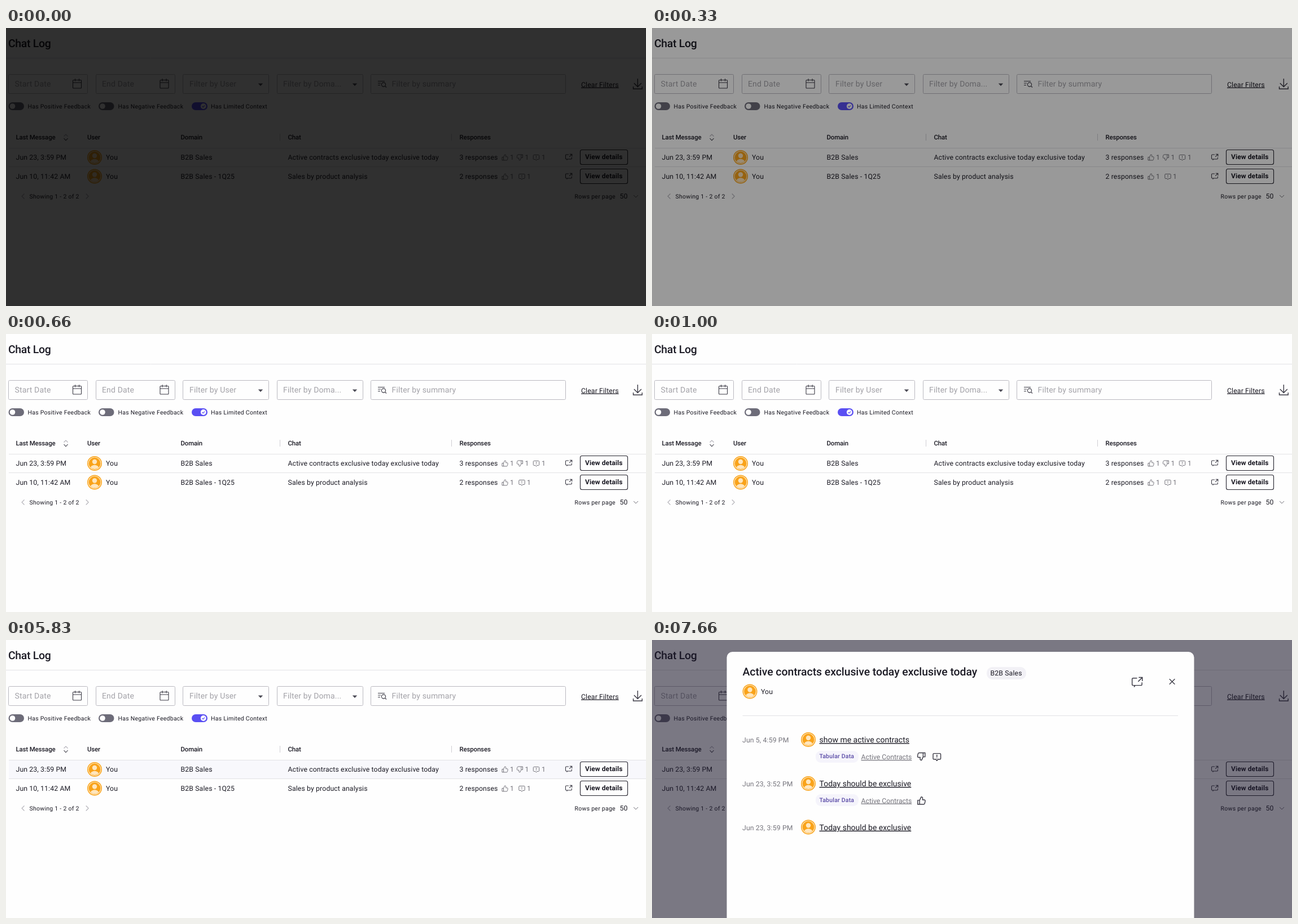
Animation, 1134 px wide and 494 px high, one loop 8000 ms. Source, as an HTML page:

```html
<!DOCTYPE html>
<html lang="en">
<head>
<meta charset="utf-8">
<title>Chat Log</title>
<style>
html, body { margin: 0; width: 100%; height: 100%; overflow: hidden; background: #fefefe; }
svg { display: block; }
text { font: 400 12.25px Roboto, "Noto Sans", sans-serif; letter-spacing: .13px; fill: #1b1a24; text-rendering: geometricPrecision; white-space: pre; }
.title { font-size: 19.4px; font-weight: 500; letter-spacing: -.05px; }
.page-title { letter-spacing: -.3px; }
.hint { font-size: 14px; letter-spacing: .15px; fill: #a3a2a8; }
.small { font-size: 10.5px; letter-spacing: .26px; }
.head { font-size: 11.4px; font-weight: 500; letter-spacing: -.12px; }
.btn { font-size: 12px; font-weight: 600; letter-spacing: .08px; }
.muted { fill: #74737b; }
.msg { font-size: 14px; letter-spacing: 0; }
.link { text-decoration: underline; text-decoration-thickness: 1px; text-underline-offset: 2px; }
.msg.link { text-decoration-color: #85848c; }
.tag { font-weight: 500; letter-spacing: .2px; fill: #594aa6; }
.line { fill: none; stroke: #e2e2e5; }
.field { fill: none; stroke: #bab9c0; }
.icon { fill: none; stroke: #3a3944; stroke-width: 1.1; }
.soft { stroke: #74737b; stroke-width: 1; }
.pale { stroke: #b2b1b8; }

#fade, #shade, #modal, .row { animation: 8s step-end infinite; }
#fade { animation-name: fade; }
#shade { animation-name: shade; }
#modal { animation-name: modal; }
#row1 { animation-name: row1; }
#row2 { animation-name: row2; }
.row { fill: #f8f8fc; }
@keyframes fade {
  0% { opacity: .81; }
  2% { opacity: .6; }
  4.125% { opacity: .4; }
  6.25% { opacity: .2; }
  8.25%, 100% { opacity: 0; }
}
@keyframes row1 {
  0% { opacity: 0; }
  64.5% { opacity: 1; }
  83.25%, 100% { opacity: 0; }
}
@keyframes row2 {
  0% { opacity: 0; }
  62.5% { opacity: 1; }
  64.5% { opacity: .4; }
  66.625%, 100% { opacity: 0; }
}
@keyframes shade {
  0% { opacity: 0; }
  83.25% { opacity: .07; }
  85.375%, 100% { opacity: 1; }
}
@keyframes modal {
  0% { opacity: 0; }
  83.25% { opacity: .07; }
  85.375% { opacity: .97; }
  87.5%, 100% { opacity: 1; }
}
</style>
</head>
<body>
<svg width="1134" height="494" viewBox="0 0 1134 494">
<defs>
  <clipPath id="face"><circle r="10"/></clipPath>
  <g id="avatar">
    <circle r="13" fill="#f9a31a"/>
    <circle r="11" fill="none" stroke="#ffe3b5" stroke-width="1.2"/>
    <g fill="#ffe6bd" clip-path="url(#face)">
      <circle cy="-3" r="4.2"/>
      <ellipse cy="8.2" rx="7.4" ry="5.4"/>
    </g>
  </g>
  <g id="calendar">
    <rect x="-7.5" y="-6.5" width="15" height="14.5" rx="1"/>
    <path d="M-7.5-2h15M-3.5-9v4.5M3.5-9v4.5"/>
  </g>
  <path id="caret" d="M-4.2-2.2h8.4L0 2.4z" fill="#4b4a55"/>
  <path id="chevron" d="M-4-2L0 2 4-2"/>
  <path id="thumb" d="M-5-.5h2.6V5H-5zM-2.4-.5L-.3-5H.4a1.3 1.3 0 0 1 1.3 1.3v2.5h2.1a1.4 1.4 0 0 1 1.4 1.6l-.6 3.1A1.7 1.7 0 0 1 3 5h-5.4"/>
  <path id="note" d="M-1.5 3.5H-4a1.2 1.2 0 0 1-1.2-1.2v-5.6A1.2 1.2 0 0 1-4-4.5h8a1.2 1.2 0 0 1 1.2 1.2v5.6A1.2 1.2 0 0 1 4 3.5H1.5L0 5.3zM0-2.8V.3M0 1.3v1"/>
  <path id="open" d="M0-4.5h-4.3A1.2 1.2 0 0 0-5.5-3.3v5.6a1.2 1.2 0 0 0 1.2 1.2h2.1L-3.4 5.3M-2.2 3.5h6.4a1.2 1.2 0 0 0 1.2-1.2V.2M1.8-5.3h4v4M5.8-5.3L1.2-.7"/>
  <g id="off">
    <rect x="-13.5" y="-7" width="27.5" height="14" rx="7" fill="#6d6c79"/>
    <circle x="0" cx="-6.5" r="4.8" fill="#fefefe"/>
  </g>
  <g id="button">
    <rect x="1017.5" y="-13" width="84" height="26" rx="3" fill="#fefefe" stroke="#24232d" stroke-width="1.1"/>
    <text class="btn" x="1026" y="3.6">View details</text>
    <use href="#open" class="icon" x="997"/>
  </g>
</defs>

<rect width="1134" height="494" fill="#fefefe"/>
<rect id="row1" class="row" x="5" y="214" width="1129" height="32"/>
<rect id="row2" class="row" x="5" y="247" width="1129" height="33"/>
<path class="line" d="M0 53.5h1134M5 213.5h1129M5 246.5h1129"/>

<text class="title page-title" x="4" y="33.6">Chat Log</text>

<g class="field">
  <rect x="4.5" y="82.5" width="140" height="34" rx="2"/>
  <rect x="159.5" y="82.5" width="140" height="34" rx="2"/>
  <rect x="313.5" y="82.5" width="152" height="34" rx="2"/>
  <rect x="480.5" y="82.5" width="152" height="34" rx="2"/>
  <rect x="646.5" y="82.5" width="345" height="34" rx="2"/>
</g>
<text class="hint" x="15.5" y="104">Start Date</text>
<text class="hint" x="170" y="104">End Date</text>
<text class="hint" x="325" y="104">Filter by User</text>
<text class="hint" x="491" y="104">Filter by Doma...</text>
<text class="hint" x="683.5" y="104">Filter by summary</text>
<g class="icon">
  <use href="#calendar" x="126" y="99"/>
  <use href="#calendar" x="280.5" y="99"/>
  <path d="M659 94.5h12M659 98h5M659 101.5h4M672 103.5l2 2"/>
  <circle cx="669" cy="100.5" r="3.6"/>
  <path d="M1119.3 90v14.5M1112.8 98l6.5 6.5 6.5-6.5M1111.5 104v4.3h15.6V104" stroke-width="1.4"/>
</g>
<use href="#caret" x="451" y="100.6"/>
<use href="#caret" x="618" y="100.6"/>
<text class="link" x="1019" y="104.6">Clear Filters</text>

<use href="#off" x="18" y="139"/>
<use href="#off" x="177.5" y="139"/>
<rect x="329" y="132" width="28" height="14" rx="7" fill="#5a4ff3"/>
<circle cx="349.8" cy="139" r="4.9" fill="#fefefe"/>
<path d="M347.5 139l1.7 1.7 2.9-3" fill="none" stroke="#5a4ff3" stroke-width="1.2"/>
<text class="small" x="38.5" y="143">Has Positive Feedback</text>
<text class="small" x="198.5" y="143">Has Negative Feedback</text>
<text class="small" x="363" y="143">Has Limited Context</text>

<text class="head" x="17.5" y="198">Last Message</text>
<text class="head" x="144" y="198">User</text>
<text class="head" x="309.5" y="198">Domain</text>
<text class="head" x="499.5" y="198">Chat</text>
<text class="head" x="803.5" y="198">Responses</text>
<path class="icon pale" d="M102.5 192.5l3.5-3.5 3.5 3.5"/>
<path class="icon" d="M102.5 196l3.5 3.8 3.5-3.8"/>
<path class="line" style="stroke:#cfced4" d="M485.5 188v12M789.5 188v12"/>

<g transform="translate(0 230)">
  <text x="17.5" y="4.2">Jun 23, 3:59 PM</text>
  <use href="#avatar" x="157"/>
  <text x="177" y="4.2">You</text>
  <text x="309.5" y="4.2">B2B Sales</text>
  <text x="499.5" y="4.2">Active contracts exclusive today exclusive today</text>
  <text x="803.5" y="4.2">3 responses</text>
  <g class="icon soft">
    <use href="#thumb" x="884"/>
    <use href="#thumb" transform="translate(910.5 0) rotate(180)"/>
    <use href="#note" x="939.5"/>
  </g>
  <text class="muted" x="893" y="4.2">1</text>
  <text class="muted" x="919.5" y="4.2">1</text>
  <text class="muted" x="949" y="4.2">1</text>
  <use href="#button" y="-.5"/>
</g>
<g transform="translate(0 264)">
  <text x="17.5" y="4">Jun 10, 11:42 AM</text>
  <use href="#avatar" x="157" y="-.5"/>
  <text x="177" y="4">You</text>
  <text x="309.5" y="4">B2B Sales - 1Q25</text>
  <text x="499.5" y="4">Sales by product analysis</text>
  <text x="803.5" y="4">2 responses</text>
  <g class="icon soft">
    <use href="#thumb" x="884"/>
    <use href="#note" x="914"/>
  </g>
  <text class="muted" x="893" y="4">1</text>
  <text class="muted" x="923" y="4">1</text>
  <use href="#button" y="-.5"/>
</g>

<path class="icon pale" d="M32.5 294.5l-4.5 4.5 4.5 4.5M141.7 294.5l4.5 4.5-4.5 4.5"/>
<text class="small" x="41.5" y="302.7">Showing 1 - 2 of 2</text>
<text class="small" x="1007.5" y="302.7">Rows per page</text>
<text x="1087.5" y="303.3">50</text>
<use href="#chevron" class="icon soft" x="1116" y="299"/>

<rect id="shade" width="1134" height="494" fill="#171428" fill-opacity=".57"/>

<g id="modal">
  <rect x="132.5" y="21" width="828" height="500" rx="10" fill="#fefefe"/>
  <text class="title" x="160.5" y="63">Active contracts exclusive today exclusive today</text>
  <rect x="593" y="48" width="70" height="22" rx="10" fill="#f2f1f6"/>
  <text x="599.5" y="63.2">B2B Sales</text>
  <use href="#avatar" x="173.5" y="91.5"/>
  <text x="193" y="96">You</text>
  <g class="icon">
    <use href="#open" transform="translate(859.5 75) scale(1.6)" stroke-width=".9"/>
    <path d="M916.8 69.2l9.6 9.6M926.4 69.2l-9.6 9.6" stroke-width="1.3"/>
  </g>
  <path class="line" d="M160.5 134.5H932"/>

  <text class="muted" x="160" y="182">Jun 5, 4:59 PM</text>
  <use href="#avatar" x="277" y="177"/>
  <text class="msg link" x="296.5" y="182.2">show me active contracts</text>
  <rect x="290" y="197" width="76" height="21" rx="9" fill="#f5f4fb"/>
  <text class="small tag" x="296.5" y="210.4">Tabular Data</text>
  <text class="muted link" style="letter-spacing:0" x="370.5" y="212">Active Contracts</text>
  <g class="icon">
    <use href="#thumb" transform="translate(477.3 207) rotate(180) scale(1.3)"/>
    <use href="#note" transform="translate(504.8 207.5) scale(1.3)"/>
  </g>

  <text class="muted" x="160" y="260">Jun 23, 3:52 PM</text>
  <use href="#avatar" x="277" y="255"/>
  <text class="msg link" x="296.5" y="260">Today should be exclusive</text>
  <rect x="290" y="274" width="76" height="21" rx="9" fill="#f5f4fb"/>
  <text class="small tag" x="296.5" y="288">Tabular Data</text>
  <text class="muted link" style="letter-spacing:0" x="370.5" y="289.6">Active Contracts</text>
  <use href="#thumb" class="icon" transform="translate(477.3 285.5) scale(1.3)"/>

  <text class="muted" x="160" y="337.8">Jun 23, 3:59 PM</text>
  <use href="#avatar" x="277" y="332.5"/>
  <text class="msg link" x="296.5" y="337.8">Today should be exclusive</text>
</g>

<rect id="fade" width="1134" height="494"/>
</svg>
</body>
</html>
```
